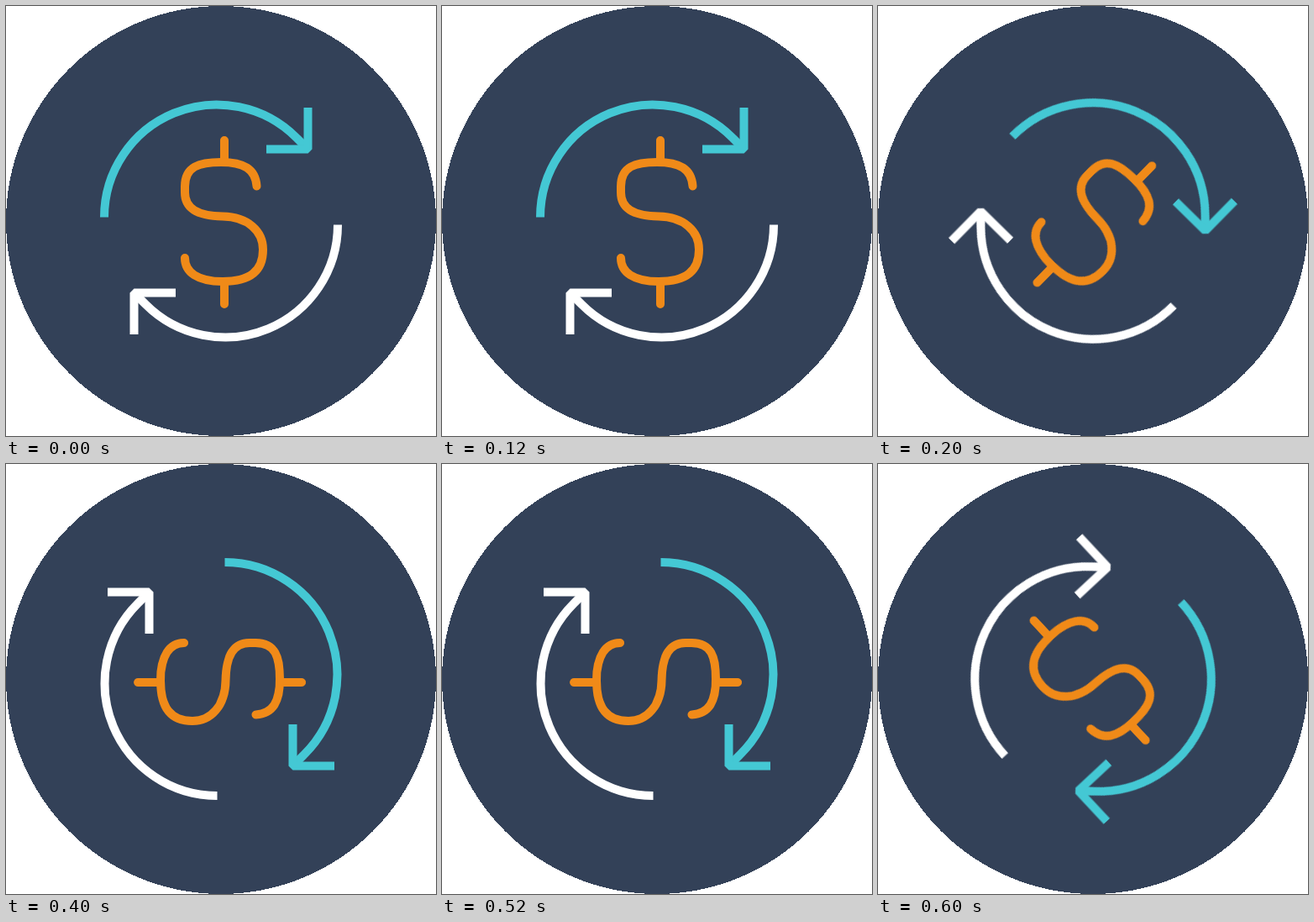
Animation, 512 px wide and 512 px high, one loop 0.8 s. Source, as an HTML page:

```html
<!DOCTYPE html>
<html lang="en">
<head>
<meta charset="utf-8">
<title>Money cycle</title>
<style>
  html, body { margin: 0; width: 100%; height: 100%; overflow: hidden; background: #fff; }
  svg { display: block; width: 100%; height: 100%; }
  .disc { fill: #334158; shape-rendering: crispEdges; }
  .spin {
    fill: none;
    stroke-width: 10;
    stroke-linejoin: bevel;
    transform-origin: 256px 256px;
    animation: spin 800ms step-end infinite;
  }
  .teal { stroke: #44c8d4; }
  .white { stroke: #fff; }
  .dollar { stroke: #f08a18; stroke-linecap: round; stroke-linejoin: round; }
  @keyframes spin {
    0% { transform: rotate(0deg); }
    25% { transform: rotate(44.5deg); }
    50% { transform: rotate(90deg); }
    75% { transform: rotate(137deg); }
    100% { transform: rotate(0deg); }
  }
</style>
</head>
<body>
<svg viewBox="0 0 512 512">
  <defs>
    <g id="arrow">
      <path d="M117 251.5A134 134 0 0 1 346 157L359 170"/>
      <path d="M359.5 121V170.5H310"/>
    </g>
  </defs>
  <circle class="disc" cx="256" cy="256" r="256"/>
  <g class="spin">
    <use href="#arrow" class="teal"/>
    <use href="#arrow" class="white" transform="rotate(180 256 256)"/>
    <g class="dollar">
      <path d="M260 160V183M260 331V355"/>
      <path d="M298.5 214.5C297 194 283 186 256 186C230 186 213 191 213 215V222
        C213 241 228 250 258 250.5C288 251 306 268 306 290
        C306 316 290 328 258 328C228 328 213 317 213 300"/>
    </g>
  </g>
</svg>
</body>
</html>
```
